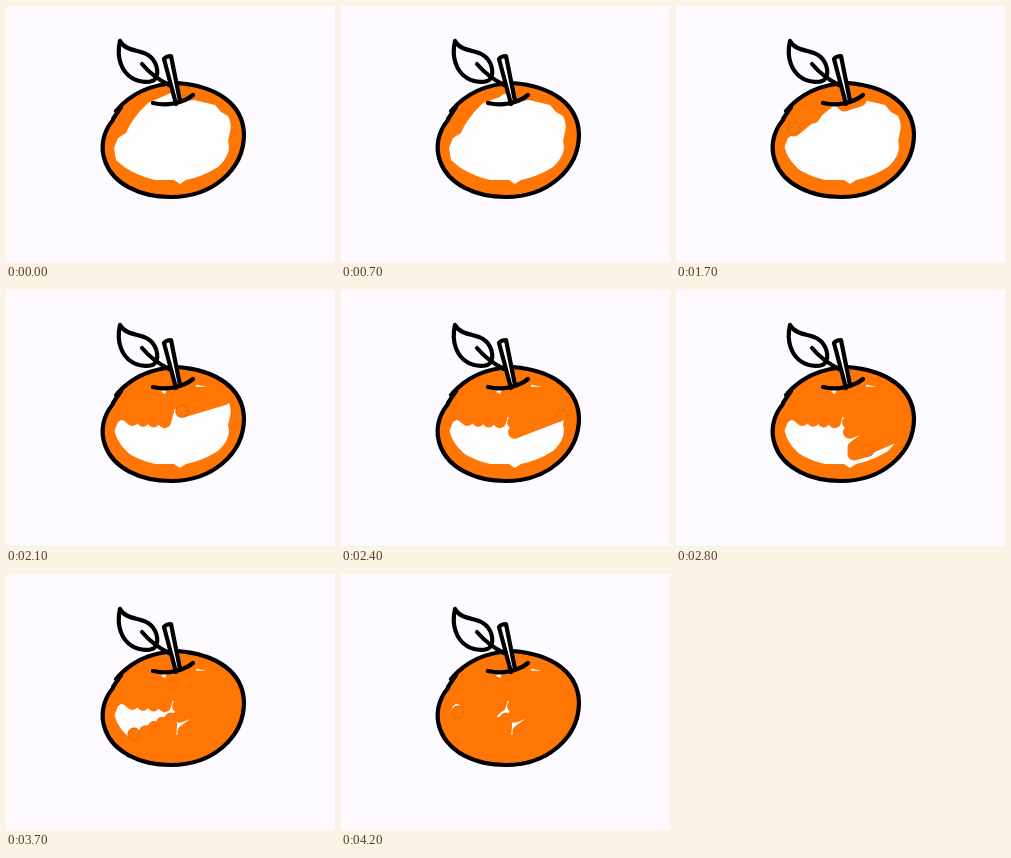
An HTML page for the animation above (4.3 s loop, 329 px wide and 256 px high).

```html
<!DOCTYPE html>
<html lang="en">
<head>
<meta charset="utf-8">
<title>Colouring an orange</title>
<style>
html, body { margin: 0; width: 100%; height: 100%; overflow: hidden; background: #fdfbff; }
svg { display: block; width: 100vw; height: 100vh; }
path { stroke-linecap: round; stroke-linejoin: round; }
.ink { fill: none; stroke: #000; stroke-width: 4.2; }
.brush { fill: none; stroke: #ff7604; stroke-width: 13; }
</style>
</head>
<body>
<svg viewBox="0 0 329 256">
  <defs>
    <path id="skin" d="M107 114C97 126 94 141 99 155C107 178 134 191 165 191C206 191 238 164 238 128C237 99 212 80 171 77C148 78 126 86 110 105"/>
    <clipPath id="inside"><use href="#skin"/></clipPath>
  </defs>
  <use href="#skin" fill="#ff7604"/>
  <path fill="#fffeff" d="M108 142L112 132 120 127Q126 112 142 97L165 87 170 97 188 94 209 99 215 106 222 110Q226 118 224 126L222 135Q226 148 212 161Q196 171 180 174L174 178 168 174 149 174Q124 168 110 154Z"/>
  <g id="paint" clip-path="url(#inside)"></g>
  <use href="#skin" class="ink"/>
  <path class="ink" d="M107 113L115 101"/>
  <path class="ink" d="M114 35C110 52 116 66 126 72C134 77 146 77 149 73C154 66 150 54 142 49C134 44 119 45 114 35Z"/>
  <path class="ink" style="fill:#fff" d="M170 98L158 53Q160 50 165 50L174 95"/>
  <path class="ink" d="M136 58Q147 71 163 79"/>
  <path class="ink" d="M147 97C160 100 176 98 187 89"/>
  <circle id="cursor" r="6" fill="none" stroke="#555" stroke-opacity=".3" stroke-width=".8"/>
</svg>
<script>
const LOOP = 4300, STEP = 100;
const mix = (a, b, s) => a.map((v, i) => v + (b[i] - v) * s);

// Scribble between two edges while they move from a, b to c, d
const scribble = (a, b, c, d, n) => Array.from({ length: n + 1 },
  (_, i) => i % 2 ? mix(b, d, i / n) : mix(a, c, i / n));

// Trip round the rim, angles in degrees
const rim = (from, to, n) => Array.from({ length: n + 1 }, (_, i) => {
  const a = (from + (to - from) * i / n) * Math.PI / 180;
  return [167 + 66 * Math.cos(a), 133 + 52 * Math.sin(a)];
});

const strokes = [
  { start: 0, end: 700, route: [[178, 84], [195, 86], [178, 82], [150, 80], [125, 96], [114, 114], [125, 96], [156, 85]] },
  { start: 700, end: 1200, route: rim(255, 0, 24) },
  { start: 1200, end: 1700, route: [[184, 94], [168, 99], [158, 88], [152, 96], [118, 124], [128, 112], [150, 92], [137, 111]] },
  { start: 1700, end: 2400, route: [
    ...scribble([118, 122], [121, 129], [166, 104], [164, 132], 8),
    ...scribble([170, 103], [216, 101], [174, 147], [221, 124], 9)] },
  { start: 2400, end: 3200, route: [
    ...scribble([221, 126], [178, 156], [217, 152], [178, 164], 5),
    ...scribble([178, 164], [217, 152], [150, 178], [185, 172], 7)] },
  { start: 3200, end: 3700, route: [
    ...scribble([165, 145], [168, 163], [127, 164], [128, 172], 9), [128, 160]] },
  { start: 3700, end: 4200, route: [
    [128, 160], ...scribble([156, 133], [142, 150], [117, 138], [113, 158], 8), [112, 146], [117, 138]] }
];

for (const s of strokes) {
  s.path = document.createElementNS("http://www.w3.org/2000/svg", "path");
  s.path.setAttribute("class", "brush");
  s.path.setAttribute("d", "M" + s.route.join("L"));
  document.getElementById("paint").append(s.path);
  s.length = s.path.getTotalLength();
}

const cursor = document.getElementById("cursor");
function draw(ms) {
  const t = Math.floor(ms % LOOP / STEP) * STEP;
  for (const s of strokes) {
    const p = Math.min(1, Math.max(0, (t - s.start) / (s.end - s.start)));
    const done = s.length * p;
    s.path.setAttribute("stroke-dasharray", `${done} ${s.length + 20}`);
    s.path.setAttribute("visibility", p ? "visible" : "hidden");
    if (t >= s.start) {
      const tip = s.path.getPointAtLength(done);
      cursor.setAttribute("cx", tip.x);
      cursor.setAttribute("cy", tip.y);
    }
  }
}

const begin = performance.now();
function tick() {
  draw(performance.now() - begin);
  requestAnimationFrame(tick);
}
tick();
</script>
</body>
</html>
```
